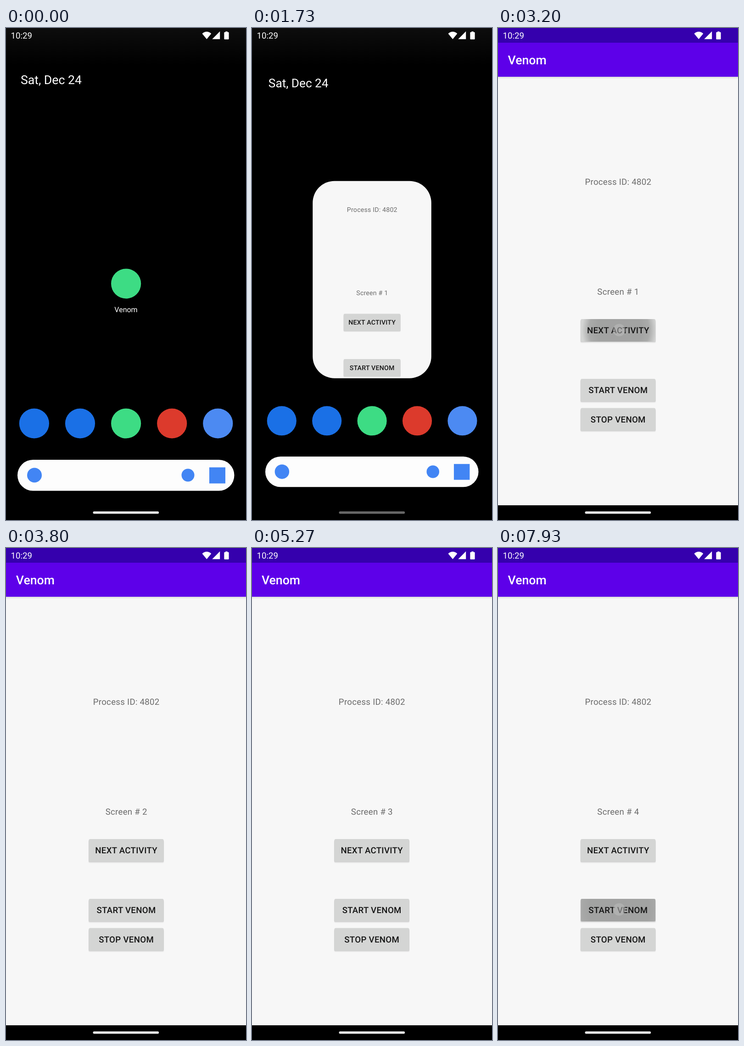
Animation of 523 by 1070 pixels, one loop 8 s. Source, as an HTML page:

```html
<!DOCTYPE html>
<html lang="en">
<head>
<meta charset="utf-8">
<title>App launch</title>
<style>
  html, body { margin: 0; width: 100%; height: 100%; overflow: hidden; background: #000; }
  svg { display: block; width: 523px; height: 1070px; font-family: Roboto, "Open Sans", sans-serif; text-rendering: geometricPrecision; }
  .body { font-size: 18.64px; letter-spacing: .29px; text-anchor: middle; fill: #6b6b6b; }
  .button { font-size: 18.64px; font-weight: 500; letter-spacing: .32px; text-anchor: middle; fill: #141414; }
</style>
</head>
<body>
<svg id="stage" viewBox="0 0 523 1070"></svg>
<script>
const LOOP = 8000, FPS = 15;
const LAUNCH = { start: 1649, length: 500 };
const SLIDES = [3443, 4300, 5250], SLIDE_LENGTH = 450, SHIFT = 52.3;
const BUTTONS = [[633, 'NEXT ACTIVITY'], [763, 'START VENOM'], [826.5, 'STOP VENOM']];
const TAPS = [
  { at: 1200, x: 262, y: 556, held: 130 },
  { at: 3067, x: 264, y: 657, held: 130, button: 0 },
  { at: 3933, x: 264, y: 657, held: 130, button: 0 },
  { at: 4800, x: 264, y: 657, held: 130, button: 0 },
  { at: 7600, x: 264, y: 786, held: 900, button: 1 }
];

const clamp = v => Math.max(0, Math.min(1, v));
const lerp = (a, b, p) => a + (b - a) * p;
const bezier = (a, b, c, d, u) => {
  const v = 1 - u;
  return a * v * v * v + 3 * b * u * v * v + 3 * c * u * u * v + d * u * u * u;
};

// Two-part emphasized curve: a quick rise, then a long settle.
function emphasized(x) {
  if (x <= 0) return 0;
  if (x >= 1) return 1;
  const [xs, ys] = x < 1 / 6
    ? [[0, .05, .133333, 1 / 6], [0, 0, .06, .4]]
    : [[1 / 6, .208333, .25, 1], [.4, .82, 1, 1]];
  let lo = 0, hi = 1;
  for (let i = 0; i < 30; i++) {
    const mid = (lo + hi) / 2;
    if (bezier(...xs, mid) < x) lo = mid; else hi = mid;
  }
  return bezier(...ys, lo);
}

const rect = (x, y, w, h, r, fill, extra = '') =>
  `<rect x="${x}" y="${y}" width="${w}" height="${h}" rx="${r}" fill="${fill}" ${extra}/>`;
const circle = (x, y, r, fill, extra = '') =>
  `<circle cx="${x}" cy="${y}" r="${r}" fill="${fill}" ${extra}/>`;

const buttonFace = ([y]) =>
  [[1, 1.2, .09], [2.2, 1.6, .05], [3.6, 2, .03]].map(([dy, grow, a]) =>
    rect(180.3 - grow / 2, y + dy, 162.7 + grow, 49, 3, '#000', `opacity="${a}"`)).join('') +
  rect(180.3, y, 162.7, 49, 2.7, '#d4d5d4');

const buttonLabel = ([y, label]) => `<text class="button" x="261.8" y="${y + 31.4}">${label}</text>`;

const content = (id, ripple) => `
  <g id="${id}">
    <text x="21.5" y="79" font-size="26.64" font-weight="500" fill="#fff">Venom</text>
    <text class="body" x="261.9" y="340.6">Process ID: 4802</text>
    <text class="body" x="261.9" y="580"></text>
    ${BUTTONS.map(buttonFace).join('')}${ripple}${BUTTONS.map(buttonLabel).join('')}
  </g>`;

const backdrop = `
  ${rect(0, 0, 523, 1070, 0, '#f7f7f7')}
  ${rect(0, 106, 523, 5, 0, 'url(#barShadow)')}
  ${rect(0, 31, 523, 75, 0, '#5d00e9')}
  ${rect(0, 0, 523, 32, 0, '#3500ad')}`;

const pressable = `<g id="rippleClip" clip-path="url(#buttonClip)">${circle(0, 0, 1, 'url(#rippleFill)', 'id="ripple"')}</g>`;

const dock = ['#1a70e6', '#1a70e6', '#3ddc84', '#dc3a2c', '#4c8af2']
  .map((fill, i) => circle(61.4 + i * 100.1, 860, 32.6, fill)).join('');

const stage = document.getElementById('stage');
stage.innerHTML = `
  <defs>
    <linearGradient id="topGlow" x2="0" y2="1"><stop stop-color="#0d0d0d"/><stop offset="1" stop-color="#000"/></linearGradient>
    <linearGradient id="barShadow" x2="0" y2="1"><stop stop-opacity=".12"/><stop offset="1" stop-opacity="0"/></linearGradient>
    <radialGradient id="rippleFill">
      <stop stop-opacity=".24"/><stop offset=".6" stop-opacity=".235"/>
      <stop offset=".8" stop-opacity=".2"/><stop offset="1" stop-opacity="0"/>
    </radialGradient>
    <clipPath id="windowClip"><rect id="windowRect"/></clipPath>
    <clipPath id="buttonClip"><rect id="buttonRect" x="180.3" width="162.7" height="49" rx="2.7"/></clipPath>
  </defs>
  ${rect(0, 0, 523, 1070, 0, '#000')}
  ${rect(0, 0, 523, 80, 0, 'url(#topGlow)')}
  <g id="home">
    <text x="32" y="122" font-size="26.64" fill="#fff">Sat, Dec 24</text>
    <text id="appLabel" x="261.5" y="618" font-size="16" text-anchor="middle" fill="#fff">Venom</text>
    ${dock}
    ${rect(25, 939, 472.5, 67.5, 33.75, '#fdfdfd')}
    ${circle(62, 972.5, 16, '#4285f4')}
    ${circle(396.5, 972.5, 14, '#4285f4')}
    ${rect(443, 955.5, 35, 35, 0, '#4285f4')}
  </g>
  <g id="window" clip-path="url(#windowClip)">
    <g id="app">
      ${backdrop}${content('back', pressable)}
      <g id="front">${content('next', '')}</g>
      ${rect(0, 1038, 523, 32, 0, '#000')}
    </g>
  </g>
  ${circle(261.6, 556, 32.6, '#3ddc84', 'id="appIcon"')}
  <g fill="#fff">
    <text x="10.6" y="23.2" font-size="18.64">10:29</text>
    <path d="M427.5 12.2Q437.4 4 447.3 12.2L437.4 24.3ZM449.3 24.2H466.2V7.2ZM478.3 7.4H482.7V9H484.3Q485.6 9 485.6 10.3V23.4Q485.6 24.7 484.3 24.7H476.7Q475.4 24.7 475.4 23.4V10.3Q475.4 9 476.7 9H478.3Z"/>
  </g>
  ${rect(189.5, 1051.2, 143.7, 5.2, 2.6, '#e6e6e6', 'id="handle"')}
  ${circle(0, 0, 13.5, '#bcbcbc', 'id="touch"')}`;

const el = id => document.getElementById(id);
const set = (id, attrs) => {
  for (const name in attrs) el(id).setAttribute(name, attrs[name]);
};
const setScreen = (id, number) => { el(id).children[2].textContent = 'Screen # ' + number; };
const scaleAbout = (x, y, s) => `translate(${x * (1 - s)} ${y * (1 - s)}) scale(${s})`;

function drawLaunch(t) {
  const since = t - LAUNCH.start;
  const p = emphasized(since / LAUNCH.length);
  const fade = clamp(since / 60);
  const w = lerp(67, 523, p), h = Math.max(w, lerp(-35, 1070, p));
  const cy = lerp(556, 535, p), s = lerp(.583, 1, p);
  set('home', { transform: scaleAbout(261.5, 520, 1 - .04 * p) });
  set('appLabel', { opacity: since < 0 ? 1 : 0 });
  set('appIcon', { opacity: 1 - fade });
  set('window', { opacity: fade });
  set('windowRect', { x: 261.5 - w / 2, y: cy - h / 2, width: w, height: h, rx: Math.min(w / 2, 82 * (1 - p)) });
  set('app', { transform: `translate(261.5 ${cy}) scale(${s}) translate(-261.5 -535)` });

  const dim = since < 85 ? lerp(230, 102, clamp(since / 85))
    : since < 351 ? lerp(102, 203, (since - 85) / 266)
    : lerp(203, 230, clamp((since - 351) / 150));
  set('handle', { fill: `rgb(${dim},${dim},${dim})` });
}

function drawScreens(t) {
  const done = SLIDES.filter(start => t >= start + SLIDE_LENGTH).length;
  const since = done < SLIDES.length ? t - SLIDES[done] : -1;
  const p = emphasized(since / SLIDE_LENGTH);
  const alpha = clamp((since - 50) / 83);
  setScreen('back', done + 1);
  setScreen('next', done + 2);
  set('back', { transform: `translate(${-SHIFT * p} 0)` });
  set('front', { opacity: alpha, transform: `translate(${SHIFT * (1 - p)} 0)` });
  // The incoming page is opaque; its own plain fills hide the outgoing text.
  el('cover').setAttribute('opacity', alpha);
}

function drawTap(t) {
  const tap = TAPS.filter(a => t >= a.at - 1).pop();
  const since = tap ? t - tap.at : 0;
  const released = tap ? clamp((since - tap.held) / 80) : 1;
  set('touch', { cx: tap ? tap.x : 0, cy: tap ? tap.y : 0, opacity: .55 * (1 - released) });

  const pressed = tap && tap.button !== undefined;
  set('rippleClip', { opacity: pressed ? clamp((since + 25) / 75) * (1 - clamp((since - tap.held - 40) / 250)) : 0 });
  if (!pressed) return;
  const grow = 1 - (1 - clamp(since / 330)) ** 2;
  set('buttonRect', { y: BUTTONS[tap.button][0] });
  set('ripple', { cx: tap.x, cy: tap.y, r: lerp(30, 110, grow) });
}

// A page-coloured cover sits between the two pages while one slides over the other.
const cover = document.createElementNS('http://www.w3.org/2000/svg', 'g');
cover.id = 'cover';
cover.innerHTML = backdrop;
el('app').insertBefore(cover, el('front'));

function draw(now) {
  const step = Math.floor((now + 5) % LOOP * FPS / 1000);
  const t = step * 1000 / FPS;
  drawLaunch(t);
  drawScreens(t);
  drawTap(t);
}

let origin;
function tick(now) {
  if (origin === undefined) origin = now;
  draw(now - origin);
  requestAnimationFrame(tick);
}
draw(0);
requestAnimationFrame(tick);
</script>
</body>
</html>
```
